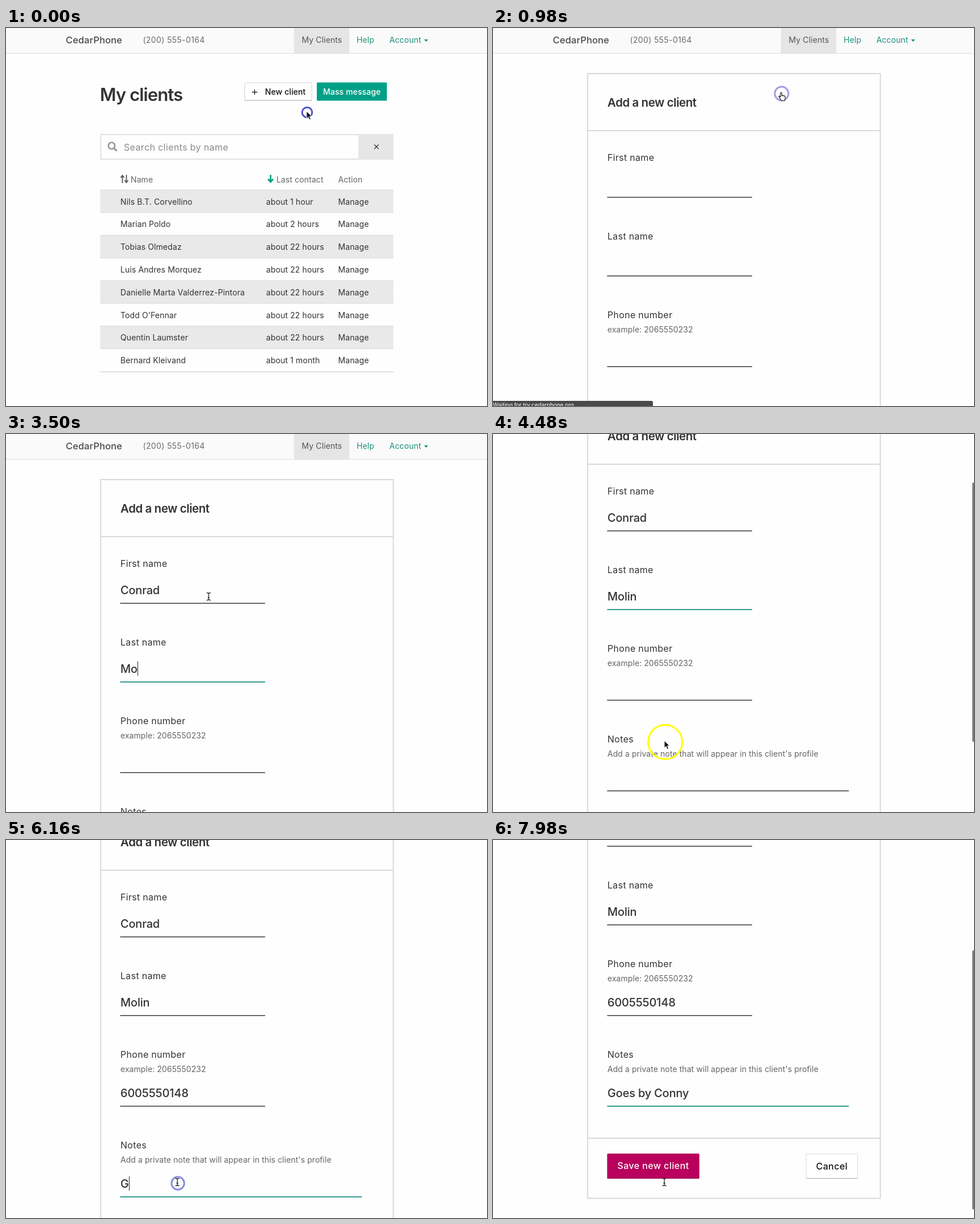
An HTML page for the animation above (8 s loop, 845 px wide and 663 px high).

```html
<!DOCTYPE html>
<html lang="en">
<head>
<meta charset="utf-8">
<title>Add a client</title>
<style>
  html, body { margin: 0; width: 100%; height: 100%; overflow: hidden; background: #fefefe; }
  svg { display: block; width: 845px; height: 663px; }
  text { font: 400 14px Inter, "Open Sans", sans-serif; letter-spacing: .1px; fill: #333; white-space: pre; }
  .link { fill: #1f8f7d; }
  .brand { font-size: 16.5px; font-weight: 500; fill: #4a4a4a; }
  .tel { fill: #6b6b6b; letter-spacing: .35px; }
  .h1 { font-size: 31px; font-weight: 600; letter-spacing: -.9px; }
  .h2 { font-size: 20.5px; font-weight: 600; letter-spacing: -.45px; }
  .btn { font-weight: 500; }
  .big { font-size: 16px; font-weight: 500; letter-spacing: .4px; }
  .find { font-size: 16px; letter-spacing: .35px; fill: #8a8a8a; }
  .th, .hint { fill: #666; }
  .hint { letter-spacing: .06px; }
  .label { font-size: 16px; letter-spacing: .3px; }
  .value { font-size: 20px; font-weight: 500; letter-spacing: -.2px; }
  .edge { fill: none; stroke: #dbd9d4; stroke-width: 2; }
  .caret { stroke: #222; stroke-width: 1; }
  .white { fill: #fff; }
</style>
</head>
<body>
<svg id="stage" viewBox="0 0 845 663">
  <g id="page">
    <g id="nav">
      <rect width="845" height="44" fill="#fafafa"/>
      <rect x="506" width="97" height="44" fill="#e5e5e5"/>
      <rect y="44" width="845" height="1" fill="#dddcd8"/>
      <text class="brand" x="105" y="26.5">CedarPhone</text>
      <text class="tel" x="240.5" y="25.5">(200) 555-0164</text>
      <text x="519.5" y="25.5" style="fill:#555">My Clients</text>
      <text class="link" x="616" y="25.5">Help</text>
      <text class="link" x="673.5" y="25.5">Account</text>
      <path class="link" d="M734.5 20h7l-3.500 4z"/>
    </g>

    <g id="list">
      <text class="h1" x="165" y="127.5">My clients</text>
      <rect x="419.5" y="96" width="117.500" height="31" rx="1" fill="#fff" stroke="#d3d3d3"/>
      <path d="M419 127h118" stroke="#bbb"/>
      <path d="M432 112.500h9.500M436.700 108v9" stroke="#222" stroke-width="1.400"/>
      <text class="btn" x="455" y="117" style="fill:#111">New client</text>
      <rect x="546" y="95.500" width="123" height="32" rx="1" fill="#00a087"/>
      <text class="btn white" x="557" y="117">Mass message</text>

      <rect class="edge" x="166.500" y="187" width="513" height="43" style="stroke:#e2e2e0"/>
      <rect x="619" y="186" width="61.500" height="45" fill="#e6e6e6"/>
      <path d="M647 204.500l7.500 7.500m0-7.500l-7.500 7.500" stroke="#333" stroke-width="1.300"/>
      <g fill="none" stroke="#999" stroke-width="2.600">
        <circle cx="185.500" cy="206.500" r="5.700"/>
        <path d="M189.700 210.700l5 5" stroke-width="3.200"/>
      </g>
      <text class="find" x="207" y="214.500">Search clients by name</text>

      <path d="M204.500 272v-13m-3 3.500l3-4 3 4M211.500 257.500v13m-3-3.500l3 4 3-4" fill="none" stroke="#555" stroke-width="1.800"/>
      <path d="M464.800 257.500v12m-4.500-4.500l4.500 5 4.500-5" fill="none" stroke="#00a087" stroke-width="2.800"/>
      <text class="th" x="219" y="270.500">Name</text>
      <text class="th" x="475" y="270.500">Last contact</text>
      <text class="th" x="583.500" y="270.500">Action</text>
      <g id="rows"></g>
    </g>

    <g id="form">
      <rect class="edge" x="166.300" y="80" width="514.200" height="834.500"/>
      <path class="edge" d="M166 180h514M166 809h514"/>
      <text class="h2" x="201" y="138">Add a new client</text>
      <g id="fields"></g>
      <rect x="200.500" y="836" width="162" height="44" rx="1.500" fill="#b8005c"/>
      <path d="M201 879.500h161" stroke="#8a0046"/>
      <text class="big white" x="218.500" y="863">Save new client</text>
      <rect x="550" y="836.500" width="90.500" height="43" rx="1" fill="#fff" stroke="#dcdcda"/>
      <path d="M550 879.500h91" stroke="#aaa"/>
      <text class="big" x="567.500" y="864" style="fill:#111">Cancel</text>
    </g>
  </g>

  <g id="status">
    <path d="M0 654h278q3 0 3 3v6H0z" fill="#4a4a4a"/>
    <text class="white" x="0" y="665" style="font-size:10px;letter-spacing:-.1px">Waiting for try.cedarphone.org…</text>
  </g>
  <rect id="bar" x="842" width="6" height="455" rx="3" fill="#7d7d7d"/>

  <circle id="halo" r="30" fill="none" stroke="#ffff05" stroke-width="3"/>
  <circle id="ring" fill="none" stroke="#3f41c4" stroke-width="3"/>
  <g id="cursor">
    <path id="arrow" d="M0 0v12.500l2.900-2.700 2.200 5 2.300-1-2.200-4.900h4z" fill="#111" stroke="#fff" stroke-width=".9"/>
    <path id="hand" d="M-1 1.500c0-2 2.400-2 2.400 0v4c.5-.8 1.900-.6 2 .3.600-.7 1.900-.4 2 .5.700-.5 1.900-.1 1.900 1v3c0 1.800-1 2.300-1 4.200H.500c0-1.500-1.700-2.300-2.600-4.200l-1.500-2.400c-.6-1.200.8-2 1.700-1L-1 8z" fill="#fff" stroke="#111" stroke-width="1.100"/>
    <path id="ibeam" d="M-3.500-6.500q3 0 3.500 1.500 .5-1.500 3.500-1.500M-3.500 6.500q3 0 3.500-1.500 .5 1.500 3.500 1.500M0-5.500v11M-1.800 1.800h3.600" fill="none" stroke="#222" stroke-width="1.300"/>
  </g>
</svg>
<script>
const LOOP = 8000, STEP = 140;
const $ = id => document.getElementById(id);

function add(parent, tag, attrs, text = '') {
  const el = document.createElementNS('http://www.w3.org/2000/svg', tag);
  for (const key in attrs) el.setAttribute(key, attrs[key]);
  el.textContent = text;
  parent.append(el);
  return el;
}

// Client table
const clients = [
  ['Nils B.T. Corvellino', '1 hour'], ['Marian Poldo', '2 hours'],
  ['Tobias Olmedaz', '22 hours'], ['Luis Andres Morquez', '22 hours'],
  ['Danielle Marta Valderrez-Pintora', '22 hours'], ["Todd O'Fennar", '22 hours'],
  ['Quentin Laumster', '22 hours'], ['Bernard Kleivand', '1 month']
];
clients.forEach(([name, ago], i) => {
  const y = 284 + i * 39.8, rows = $('rows');
  if (i % 2 === 0) add(rows, 'rect', { x: 165.5, y, width: 515, height: 39.8, fill: '#e9e9e9' });
  add(rows, 'path', { d: `M165.5 ${y}h515`, stroke: '#dbdad6' });
  add(rows, 'text', { x: 201, y: y + 25.5 }, name);
  add(rows, 'text', { x: 457, y: y + 25.5 }, 'about ' + ago);
  add(rows, 'text', { x: 583.5, y: y + 25.5 }, 'Manage');
});
add($('rows'), 'path', { d: 'M165.5 603h515', stroke: '#d3d2ce', 'stroke-width': 1.5 });

// Form fields: typing starts at `start` with `from` letters, one more every `pace` ms
const fields = [
  { label: 'First name', y: 297, w: 254.7, word: 'Conrad', start: 2240, from: 1, pace: 140, focus: [1680, 3500], caret: 3500 },
  { label: 'Last name', y: 435, w: 254.7, word: 'Molin', start: 3500, from: 2, pace: 140, focus: [3500, 4860], caret: 4060 },
  { label: 'Phone number', hint: 'example: 2065550232', y: 594, w: 254.7, word: '6005550148', start: 4900, from: 1, pace: 62, focus: [4860, 5880], caret: 5700 },
  { label: 'Notes', hint: "Add a private note that will appear in this client's profile", y: 753, w: 424.5, word: 'Goes by Conny', start: 6160, from: 1, pace: 114, focus: [5880, LOOP], caret: 7840 }
];
for (const f of fields) {
  const box = $('fields'), top = f.y - (f.hint ? 85 : 64);
  add(box, 'text', { class: 'label', x: 201, y: top }, f.label);
  if (f.hint) add(box, 'text', { class: 'hint', x: 201, y: top + 25 }, f.hint);
  f.value = add(box, 'text', { class: 'value', x: 201, y: f.y - 16 });
  f.line = add(box, 'path', { d: `M200.500 ${f.y - .2}h${f.w}`, 'stroke-width': 1.7 });
  f.bar = add(box, 'path', { class: 'caret', d: `M0 ${f.y - 36}v25` });
}

// Time tracks
const path = [
  [0, 528, 146], [140, 528, 146], [560, 506, 113], [1120, 506, 113], [1500, 356, 285],
  [3920, 356, 285], [4200, 301, 538], [4480, 301, 538], [4800, 297, 438], [5180, 297, 438],
  [5440, 298, 490], [5480, 298, 490], [5800, 301, 600]
];
const scrolls = [[4060, 0], [4440, 127], [7700, 127], [7980, 286]];
const shapes = [[0, 'arrow'], [380, 'hand'], [1200, 'arrow'], [1400, 'ibeam'], [4060, 'arrow'], [4700, 'ibeam'], [5250, 'arrow'], [5740, 'ibeam']];
const halos = [[140, 560], [1200, 1590], [4060, 4800], [5250, 5880]];
const clicks = [-70, 630, 1590, 4850, 5880];
const RING = 700;

const within = (t, [a, b]) => t >= a && t < b;
const show = (el, on) => el.setAttribute('visibility', on ? 'visible' : 'hidden');

function track(keys, t) {
  const i = keys.findIndex(k => k[0] > t);
  if (i === 0) return keys[0].slice(1);
  if (i < 0) return keys[keys.length - 1].slice(1);
  const a = keys[i - 1], b = keys[i];
  const u = (t - a[0]) / (b[0] - a[0]), e = u * u * (3 - 2 * u);
  return a.slice(1).map((v, k) => v + (b[k + 1] - v) * e);
}

function drawField(f, t) {
  const n = t < f.start ? 0 : f.from + Math.floor((t - f.start) / f.pace);
  const text = f.word.slice(0, n), active = within(t, f.focus);
  if (f.value.textContent !== text) f.value.textContent = text;
  f.line.setAttribute('stroke', active ? '#168f82' : '#555');
  show(f.bar, active && t < f.caret);
  const x = 201 + (text ? f.value.getComputedTextLength() : 0);
  f.bar.setAttribute('transform', `translate(${Math.round(x) + .5})`);
}

function drawPointer(t) {
  const [x, y] = track(path, t);
  $('cursor').setAttribute('transform', `translate(${x} ${y})`);
  const shape = shapes.filter(s => s[0] <= t).pop()[1];
  for (const id of ['arrow', 'hand', 'ibeam']) show($(id), id === shape);

  const halo = $('halo');
  show(halo, halos.some(h => within(t, h)));
  halo.setAttribute('cx', x + 1.5);
  halo.setAttribute('cy', y + 2.3);

  const click = clicks.filter(c => c <= t).pop(), age = (t - click) / RING;
  const ring = $('ring'), [cx, cy] = track(path, click);
  show(ring, age < 1);
  ring.setAttribute('cx', cx + 1);
  ring.setAttribute('cy', cy + 2);
  ring.setAttribute('r', 8 + 8 * age);
  ring.setAttribute('opacity', Math.max(0, 1 - age));
}

function draw(t) {
  const [scroll] = track(scrolls, t), onForm = t >= 840;
  $('page').setAttribute('transform', `translate(0 ${-scroll})`);
  $('list').style.display = onForm ? 'none' : '';
  $('form').style.display = onForm ? '' : 'none';
  show($('status'), within(t, [840, 1260]));
  show($('bar'), within(t, [4060, 5880]) || t >= 7840);
  $('bar').setAttribute('y', scroll * .68 - 1.3);
  if (onForm) fields.forEach(f => drawField(f, t));
  drawPointer(t);
}

function tick() {
  const t = performance.now() % LOOP;
  draw(Math.floor(t / STEP) * STEP);
  requestAnimationFrame(tick);
}
tick();
</script>
</body>
</html>
```
